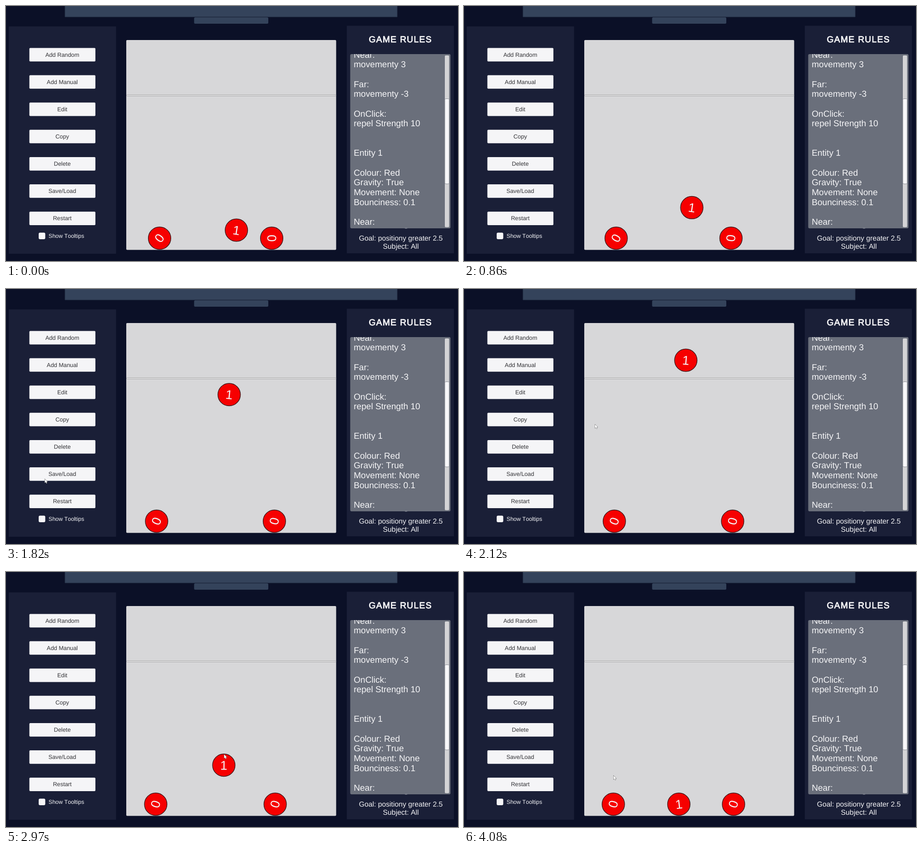
An HTML page with a canvas that plays this animation: 996 px wide and 562 px high, repeating every 4.79 s.

```html
<!DOCTYPE html>
<html>
<head>
<meta charset="utf-8">
<style>
  html, body { margin: 0; width: 100%; height: 100%; overflow: hidden; background: #0b1027; }
  canvas { display: block; }
</style>
</head>
<body>
<canvas id="stage" width="996" height="562"></canvas>
<script>
const ctx = document.getElementById('stage').getContext('2d');
const FONT = '"Liberation Sans", Arial, sans-serif';
const LOOP = 4790, FIRST_STEP = 410, STEP = 140, LAST_STEP = 26;
const FLOOR = 511.7, RADIUS = 25;
const LIGHT = '#f5f5f7', PANEL = '#1a1f37', BAR = '#34435b';

// Mouse path: time, x, y
const POINTER = [[1830, 85, 418], [2390, 491, 177], [2530, 491, 177], [3110, 476, 487], [3370, 474, 486], [4070, 329, 448]];
const arrow = new Path2D('M.5.5V9.2L2.5 7.5 4 10.5 5.4 9.8 4 7H6.6Z');

ctx.fontKerning = 'none';
ctx.textRendering = 'geometricPrecision';

function box(x, y, w, h, fill, radius = 0, stroke) {
  ctx.beginPath();
  ctx.roundRect(x, y, w, h, radius);
  ctx.fillStyle = fill;
  ctx.fill();
  if (!stroke) return;
  ctx.strokeStyle = stroke;
  ctx.lineWidth = 1;
  ctx.stroke();
}

function label(text, x, y, size, { fill = LIGHT, align = 'center', spacing = 0, embolden = 0 } = {}) {
  ctx.font = `${size}px ${FONT}`;
  ctx.letterSpacing = spacing + 'px';
  ctx.textAlign = align;
  ctx.fillStyle = fill;
  ctx.fillText(text, x, y);
  if (!embolden) return;
  ctx.strokeStyle = fill;
  ctx.lineWidth = embolden;
  ctx.strokeText(text, x, y);
}

function ball(x, y, digit, degrees) {
  ctx.save();
  ctx.translate(x, y);
  ctx.beginPath();
  ctx.arc(0, 0, RADIUS - 0.2, 0, 7);
  ctx.fillStyle = '#f60000';
  ctx.fill();
  ctx.strokeStyle = '#45191b';
  ctx.lineWidth = 1.5;
  ctx.stroke();
  ctx.rotate(degrees * Math.PI / 180);
  label(digit, 0, 10, 28);
  ctx.restore();
}

function pointer(t) {
  const i = POINTER.findLastIndex(p => p[0] <= t);
  if (i < 0) return;
  const from = POINTER[i], to = POINTER[i + 1] || from;
  const part = (t - from[0]) / (to[0] - from[0] || 1);
  ctx.save();
  ctx.translate(from[1] + (to[1] - from[1]) * part, from[2] + (to[2] - from[2]) * part);
  ctx.fillStyle = '#fff';
  ctx.strokeStyle = '#333';
  ctx.lineWidth = 0.9;
  ctx.stroke(arrow);
  ctx.fill(arrow);
  ctx.restore();
}

function controls() {
  box(6, 45, 236.5, 501, PANEL);
  ['Add Random', 'Add Manual', 'Edit', 'Copy', 'Delete', 'Save/Load', 'Restart'].forEach((name, i) => {
    const y = 92.4 + i * 60.13;
    box(51.5, y, 145.5, 29.8, LIGHT, 2);
    label(name, 124, y + 19.2, 12.8, { fill: '#323236' });
  });
  box(72, 499.5, 14.5, 14.5, LIGHT, 3);
  label('Show Tooltips', 93.8, 511.3, 12.5, { align: 'left' });
}

function rules() {
  box(751, 43.5, 236, 501.5, PANEL);
  label('GAME RULES', 799.6, 79.5, 19.2, { align: 'left', spacing: 1.34, embolden: 0.9 });
  box(758.5, 106, 221, 384, '#6a6f7b', 3);
  box(879, 489, 5, 1.5, '#8a8e98');

  ctx.save();
  ctx.beginPath();
  ctx.rect(758, 106, 208, 384);
  ctx.clip();
  ['Near:', 'movementy 3', '', 'Far:', 'movementy -3', '', 'OnClick:', 'repel Strength 10', '', '', 'Entity 1', '',
    'Colour: Red', 'Gravity: True', 'Movement: None', 'Bounciness: 0.1', '', 'Near:']
    .forEach((line, i) => label(line, 766.2, 113.5 + i * 21.69, 19.1, { align: 'left' }));
  ctx.restore();

  box(967, 109, 9.5, 378.5, '#d4d4d6', 2);
  box(967, 204.5, 9.5, 187.5, '#f7f7f9', 2, '#8d9097');
  label('Goal: positiony greater 2.5', 870, 517.3, 15.75);
  label('Subject: All', 870, 535.3, 15.75);
}

// Accelerating lift to the line, then free fall to the floor
function riserY(t) {
  const lift = Math.max(0, t - 380);
  return t < 2040
    ? 494 - 0.07 * lift - 0.000076 * lift ** 2
    : Math.min(FLOOR, 152 + 0.0005 * (t - 2210) ** 2);
}

function arena(t) {
  box(265, 75, 462.5, 462.5, '#d7d7d9', 2);
  // The two outer balls roll apart and slow down
  const left = t && 10.2 * (1 - Math.exp((300 - t) / 1500));
  const right = left * 0.9;
  const turn = 180 / Math.PI / RADIUS;
  ball(338.4 - left, FLOOR, '0', 127 - left * turn);
  ball(585.5 + right, FLOOR, '0', 90 + right * turn);

  const drift = Math.min(34.3, 0.0105 * Math.max(0, t - 310));
  ball(507.7 - drift, riserY(t), '1', 9 - 16 * (t / 4080) ** 2);
  box(265.5, 195.5, 461.5, 3, '#dededf', 1, '#aaaaac');
}

function draw(t) {
  box(0, 0, 996, 562, '#0b1027');
  box(130, -4, 732, 28, BAR, 0, '#28344b');
  box(414.5, 25, 163.5, 14, BAR, 2.5);
  controls();
  rules();
  arena(t);
  pointer(t);
}

// The picture holds at first, then advances in even steps until the final hold
function stepped(now) {
  if (now < FIRST_STEP) return 0;
  const step = Math.min(LAST_STEP, Math.floor((now - FIRST_STEP) / STEP));
  return FIRST_STEP + 20 + step * STEP;
}

const start = performance.now();
function tick() {
  draw(stepped((performance.now() - start) % LOOP));
  requestAnimationFrame(tick);
}
tick();
</script>
</body>
</html>
```
